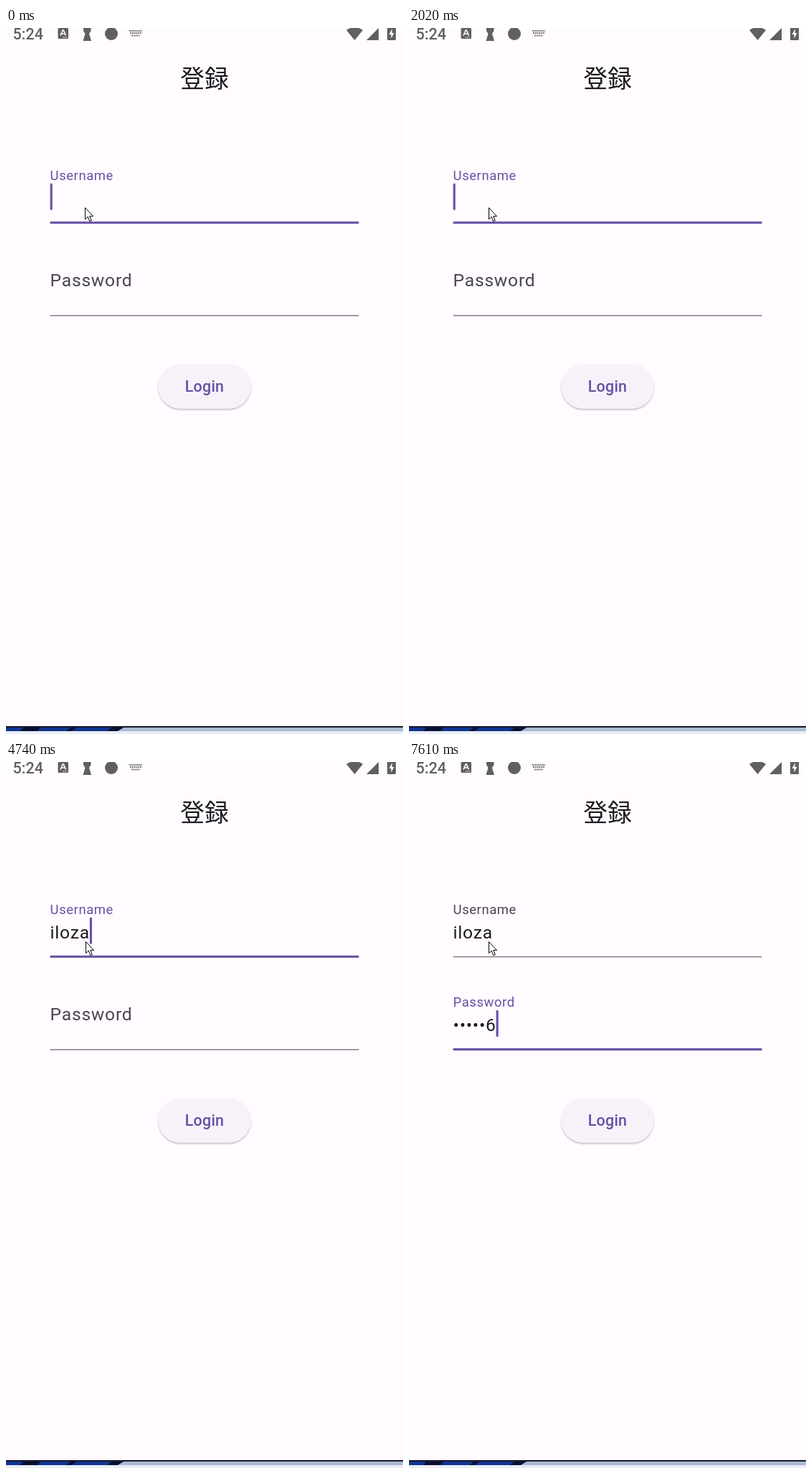
Recreate the animation shown at these times as an HTML page. Size 554 by 984 pixels, loop 8000 ms.

```html
<!DOCTYPE html>
<html lang="ja">
<head>
<meta charset="utf-8">
<style>
  html, body { margin: 0; width: 100%; height: 100%; overflow: hidden; background: #fffbff; }
  svg { display: block; width: 554px; height: 984px; }
  text { font-family: Roboto, sans-serif; white-space: pre; }
  .field { font-size: 24.62px; letter-spacing: .77px; }
  .ink { fill: #1c1b1f; }
  .title { font: 33.8px "Noto Sans CJK JP", "Noto Sans CJK", sans-serif; }
  .button { font-size: 21.54px; font-weight: 500; letter-spacing: .15px; fill: #6750a4; }
  .clock { font-size: 21.5px; font-weight: 500; }
  .number { font: 18px "Open Sans", sans-serif; fill: #5c5c5c; }
  .word { font: 19px "Noto Sans CJK SC", "Noto Sans CJK", sans-serif; fill: #1b1b1b; }
</style>
</head>
<body>
<svg viewBox="0 0 554 984">
  <defs>
    <filter id="soft" x="-20%" y="-30%" width="140%" height="180%">
      <feDropShadow dx="0" dy="1.5" stdDeviation="1.2" flood-color="#201030" flood-opacity=".32"/>
    </filter>
    <filter id="deep" x="-10%" y="-50%" width="120%" height="220%">
      <feDropShadow dx="0" dy="7" stdDeviation="6" flood-color="#000" flood-opacity=".17"/>
    </filter>
  </defs>
  <rect width="554" height="984" fill="#fffbff"/>

  <!-- status bar -->
  <g fill="#606062">
    <text class="clock" x="9.5" y="16">5:24</text>
    <rect x="72.5" y="0" width="14.5" height="15" rx="1.5"/>
    <path d="M76 10.5L79.2 3H80.2L83.4 10.5M77.3 8H82" fill="none" stroke="#fff" stroke-width="1.6"/>
    <path d="M79 13H85" stroke="#fff" stroke-dasharray="1.5 1"/>
    <path d="M108 0H118.500V4L116 8L119 18H107.500L110.500 8L108 4Z"/>
    <circle cx="147" cy="8" r="9"/>
    <path d="M172 4H190M173 7H189M175 10.500H187" stroke="#77777a" stroke-width="2" stroke-dasharray="2 .8"/>
    <path d="M475 3Q486.500 -5 498 3L486.500 17Z"/>
    <path d="M503 17H520V0Z"/>
    <rect x="532" y="-3" width="12" height="20" rx="1.5"/>
    <path d="M539 1L534.500 9H537.500V14.500L541.500 7H538.500Z" fill="#fff"/>
  </g>

  <text class="title ink" x="277" y="83" text-anchor="middle">登録</text>

  <g id="fields"></g>
  <rect id="caret" width="3.1" height="36.7"/>

  <rect x="212.500" y="469" width="129" height="61.500" rx="30.750" fill="#f7f2fa" filter="url(#soft)"/>
  <text class="button" x="277" y="507" text-anchor="middle">Login</text>

  <!-- candidate window -->
  <g id="ime">
    <rect x="-30" y="291" width="579.500" height="43" rx="8" fill="#f9f9f9" stroke="#e3e3e3" filter="url(#deep)"/>
    <g id="words"></g>
    <path d="M411.500 294V332M477.500 294V332M514.500 294V332" stroke="#e6e6e6"/>
    <path d="M433.500 309V319L425.500 314Z" fill="#a6a6a6"/>
    <path d="M455.500 309V319L463.500 314Z" fill="#111"/>
    <g fill="none" stroke="#1b1b1b" stroke-width="1.4">
      <path d="M494 305.500H490.500Q487 305.500 487 309V319Q487 322.500 490.500 322.500H500.500Q504 322.500 504 319V315"/>
      <path d="M525 310.500L532.500 318L540 310.500"/>
    </g>
    <path d="M499 315L493.500 309.500C491 306 495.500 302 499 305.500C502.500 302 507 306 504.500 309.500Z" fill="#111"/>
    <rect id="paper" x="108" y="269" height="22" fill="#fff"/>
    <rect x="110" y="272" width="2" height="13"/>
    <path id="dots" stroke="#000" stroke-dasharray="1 1"/>
    <path id="second" d="M115 272V274M115 276V285" stroke="#000" stroke-width="2"/>
    <rect id="bar" x="117" y="269" width="2" height="22"/>
  </g>

  <path id="mouse" d="M.5 .5V16.500L4.200 13L6.800 19.500L9.300 18.500L6.700 12.300H11.500Z" fill="#fff" stroke="#000"/>

  <!-- strip of desktop below the window -->
  <rect y="973" width="554" height="11" fill="#e8edf6"/>
  <rect y="975" width="554" height="5" fill="#a9bad3"/>
  <path d="M0 975H164L156 980H0Z" fill="#0b1030"/>
  <path d="M0 975H24L20 980H0ZM48 975H90L84 980H44ZM98 975H147L141 980H92Z" fill="#10358f"/>
  <rect y="973" width="554" height="2" fill="#14172b"/>
</svg>
<script>
const LOOP = 8000, LEFT = 61.6, ROW = 129.3;
const PURPLE = '#6750a4';
const $ = id => document.getElementById(id);
const set = (el, attrs) => { for (const k in attrs) el.setAttribute(k, attrs[k]); };
const show = (id, on) => set($(id), { opacity: +on });
const lerp = (a, b, p) => a + (b - a) * p;
const mix = (a, b, p) => `color-mix(in srgb, ${b} ${p * 100}%, ${a})`;

// Each track holds [time, value] steps; a value lasts until the next one.
const tracks = {
  mouse: [[0, 110], [70, 111]],
  name: [[0, ''], [2090, 'il'], [3340, 'ilo'], [4610, 'iloz'], [4740, 'iloza']],
  secret: [[0, '']].concat([6610, 6880, 7010, 7410, 7510, 7610].map((t, i) => [t, '•'.repeat(i) + (i + 1)])),
  caret: [0, 200, 600, 1150, 1680, 2750, 3210, 3950, 4480, 5350, 5400, 5800, 6280].map((t, i) => [t, 1 - i % 2]),
  focus: [[0, 0], [5350, .5], [5400, 1]],
  ime: [[0, 0], [950, 1], [1950, .5], [2020, 0]],
  typed: [[0, 1], [1080, 2]],
  bar: [[0, 0], [1080, 1], [1420, 0]]
};
const at = (name, t) => tracks[name].findLast(step => step[0] <= t)[1];

const fields = ['Username', 'Password'].map((label, i) => {
  const g = document.createElementNS('http://www.w3.org/2000/svg', 'g');
  set(g, { transform: `translate(${LEFT} ${i * ROW})` });
  g.innerHTML = `<text class="field">${label}</text><text class="field ink" y="246"></text><rect width="430.8"/>`;
  $('fields').append(g);
  const [title, value, line] = g.children;
  return { title, value, line };
});

$('words').innerHTML = [...'零里啦楼六'].map((word, i) => {
  const x = 11 + i * 82.75;
  return `<text class="number" x="${x}" y="321">${i + 3}</text><text class="word" x="${x + 15.6}" y="321.5" lang="zh-CN">${word}</text>`;
}).join('');

function drawField({ title, value, line }, text, active, float) {
  const thick = lerp(1.54, 3.08, active);
  set(title, { transform: `translate(0 ${lerp(230.7, 211.5, float)}) scale(${lerp(1, .75, float)})` });
  title.style.fill = mix('#49454f', PURPLE, active);
  if (value.textContent !== text) value.textContent = text;
  set(line, { y: 272.8 - thick + (1 - active) * -.5, height: thick });
  line.style.fill = mix('#857f88', PURPLE, active);
}

function draw(now) {
  const t = now % LOOP, focus = at('focus', t), row = focus === 1 ? 1 : 0;
  drawField(fields[0], at('name', t), 1 - focus, 1);
  drawField(fields[1], at('secret', t), focus, focus);

  const { value } = fields[row];
  const width = value.textContent ? value.getComputedTextLength() : 0;
  set($('caret'), {
    x: LEFT + width, y: 216.8 + row * ROW, opacity: at('caret', t),
    fill: t >= 5400 && t < 5800 ? '#6a6272' : PURPLE
  });

  const typed = at('typed', t);
  show('second', typed > 1);
  show('bar', at('bar', t));
  set($('paper'), { width: typed > 1 ? 11 : 6 });
  set($('dots'), { d: `M109 290.5h${typed > 1 ? 9 : 4}` });
  set($('ime'), { opacity: at('ime', t) });
  set($('mouse'), { transform: `translate(${at('mouse', t)} 250)` });
}

const start = performance.now();
(function tick() {
  draw(performance.now() - start);
  requestAnimationFrame(tick);
})();
</script>
</body>
</html>
```
